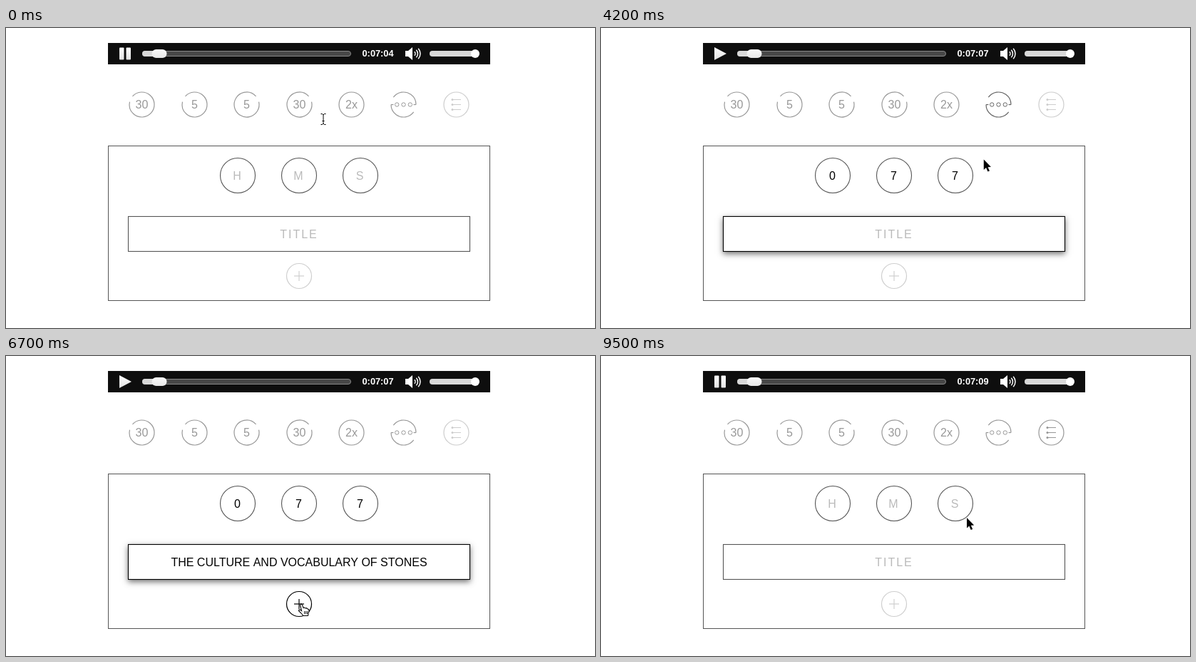
Write an HTML page with a canvas that moves like this. It is 826 px wide and 421 px high and loops after 10000 ms.

```html
<!DOCTYPE html>
<html lang="en">
<head>
<meta charset="utf-8">
<title>Audio player with chapter form</title>
<style>
  html, body { margin: 0; width: 100%; height: 100%; overflow: hidden; background: #fff; }
  canvas { display: block; }
</style>
</head>
<body>
<canvas id="stage" width="826" height="421"></canvas>
<script>
const ctx = document.getElementById('stage').getContext('2d');
const LOOP = 10000, STEP = 100;
const FONT = '"Liberation Sans", Arial, sans-serif';
const TITLE = 'THE CULTURE AND VOCABULARY OF STONES';

// Pointer keys: time, x, y, kind
const POINTER = [
  [0, 445, 128, 'beam'], [100, 445, 128, 'beam'], [200, 430, 140, 'arrow'],
  [400, 370, 156, 'arrow'], [600, 300, 140, 'arrow'], [800, 230, 90, 'arrow'],
  [1000, 180, 48, 'arrow'], [1200, 166, 35, 'arrow'], [1300, 166, 35, 'arrow'],
  [1400, 166, 34, 'arrow'], [1600, 166, 34, 'arrow'], [1700, 167, 32, 'arrow'],
  [1800, 167, 34, 'arrow'], [2900, 167, 34, 'arrow'], [3000, 185, 40, 'arrow'],
  [3300, 576, 131, 'arrow'], [3500, 576, 131, 'arrow'], [3600, 557, 117, 'hand'],
  [4000, 557, 117, 'hand'], [4100, 550, 150, 'arrow'], [4500, 497, 288, 'beam'],
  [4600, 494, 292, 'beam'], [4700, 494, 292, 'beam'], [4800, 489.5, 292, 'beam'],
  [5200, 489.5, 292, 'none'], [6200, 489, 292, 'beam'], [6400, 460, 325, 'arrow'],
  [6600, 416, 347, 'hand'], [6700, 414, 348, 'hand'], [7400, 414, 348, 'hand'],
  [7500, 415.5, 345, 'arrow'], [7900, 415.5, 345, 'arrow'], [8300, 168, 38, 'arrow'],
  [8400, 168, 36, 'arrow'], [8900, 513, 227, 'arrow'], [LOOP, 513, 227, 'arrow']
];
const TICKS = [700, 1700, 2600, 8500, 9500];

const clamp = v => Math.max(0, Math.min(1, v));
const ramp = (t, from, to) => clamp((t - from) / (to - from));
const grey = v => `rgb(${Math.round(v)},${Math.round(v)},${Math.round(v)})`;
const rad = deg => deg * Math.PI / 180;

function line(color, width, ...points) {
  ctx.beginPath();
  points.forEach(([x, y]) => ctx.lineTo(x, y));
  ctx.strokeStyle = color;
  ctx.lineWidth = width;
  ctx.stroke();
}

function polygon(fill, points) {
  ctx.beginPath();
  points.forEach(([x, y]) => ctx.lineTo(x, y));
  ctx.closePath();
  ctx.fillStyle = fill;
  ctx.fill();
}

function arc(x, y, r, color, width = 1.2, from = 0, to = 360) {
  ctx.beginPath();
  ctx.arc(x, y, r, rad(from), rad(to));
  ctx.strokeStyle = color;
  ctx.lineWidth = width;
  ctx.stroke();
}

function disc(x, y, r, color) {
  ctx.beginPath();
  ctx.arc(x, y, r, 0, 7);
  ctx.fillStyle = color;
  ctx.fill();
}

function pill(x, y, w, h, fill, stroke) {
  ctx.beginPath();
  ctx.roundRect(x, y, w, h, h / 2);
  ctx.fillStyle = fill;
  ctx.fill();
  if (stroke) {
    ctx.strokeStyle = stroke;
    ctx.lineWidth = 1;
    ctx.stroke();
  }
}

function text(str, x, y, color, { font = '16px', spacing = 0, align = 'center' } = {}) {
  ctx.font = `${font} ${FONT}`;
  ctx.letterSpacing = `${spacing}px`;
  ctx.textAlign = align;
  ctx.fillStyle = color;
  ctx.fillText(str, x, y);
}

function drawPlayer(t) {
  ctx.fillStyle = '#0e0e0e';
  ctx.fillRect(143, 21, 536, 30);
  const shine = ctx.createLinearGradient(0, 27, 0, 45);
  shine.addColorStop(0, '#fff');
  shine.addColorStop(1, '#e2e2e2');
  if (t < 3000 || t >= 8400) {
    ctx.fillStyle = shine;
    for (const x of [159, 168.5]) {
      ctx.beginPath();
      ctx.roundRect(x, 27.5, 6.5, 17, 1);
      ctx.fill();
    }
  } else {
    polygon(shine, [[159, 27], [176, 36], [159, 45]]);
  }

  pill(191.5, 32.5, 292, 7, '#484848', '#888');
  pill(191, 32, 24, 8, '#d8d8d8');
  pill(204.5, 30, 21, 12, shine);

  const seconds = 4 + TICKS.filter(tick => t >= tick).length;
  text(`0:07:0${seconds}`, 499.5, 40, '#fff', { font: 'bold 12.8px', align: 'left' });

  polygon('#fff', [[560, 32], [564, 32], [570, 27], [570, 45], [564, 40], [560, 40]]);
  arc(570, 36, 4, '#fff', 1.5, -45, 45);
  arc(570, 36, 7.5, '#fff', 1.5, -45, 45);
  arc(570, 36, 11, '#fff', 1.5, -42, 42);
  pill(594, 32, 66, 8, '#d8d8d8');
  disc(658, 36, 6, '#fff');
}

function drawList(t) {
  const x = 631.5, y = 107.5;
  const glow = t < 8000 ? ramp(t, 7200, 7600) : 1 - ramp(t, 7900, 8300);
  const base = 205 - 55 * ramp(t, 7200, 7600);
  ctx.globalAlpha = glow;
  disc(x, y, 18, '#949494');
  ctx.globalAlpha = 1;
  arc(x, y, 17.5, grey(base));
  const ink = grey(base + (255 - base) * glow);
  for (const row of [100.5, 107.5, 114.5]) {
    line(ink, 1, [626, row], [638, row]);
    disc(626, row, 1.5, ink);
  }
}

function drawToolbar(t) {
  const ink = '#989898', y = 107.5;
  const skips = [['30', 190.5, true], ['5', 264.5, true], ['5', 337.5, false], ['30', 411.5, false]];
  for (const [label, x, back] of skips) {
    if (back) arc(x, y, 17.5, ink, 1.2, 222, 553);
    else arc(x, y, 17.5, ink, 1.2, -13, 318);
    text(label, x, 113, ink);
  }
  arc(484.5, y, 17.5, ink);
  text('2x', 484.5, 113, ink);

  const hover = ramp(t, 3600, 3800) * (1 - ramp(t, 4000, 4300));
  const dots = grey(152 * (1 - hover));
  arc(557.5, y, 17.5, dots, 1.2, 216, 360);
  arc(557.5, y, 17.5, dots, 1.2, 36, 180);
  line(dots, 1.2, [540, y], [543.5, y]);
  line(dots, 1.2, [571.5, y], [575, y]);
  for (const x of [548.2, 557.5, 566.8]) arc(x, y, 2.7, dots, 1);
  drawList(t);
}

function drawForm(t) {
  const edge = '#555';
  ctx.strokeStyle = edge;
  ctx.lineWidth = 1;
  ctx.strokeRect(143.5, 165.5, 535, 217);

  const filled = t >= 3900 && t < 7400;
  ['H', 'M', 'S'].forEach((letter, i) => {
    const x = 325 + 86 * i;
    arc(x, 207, 24.5, edge, 1.1);
    if (filled) text('077'[i], x - 0.5, 213, '#000');
    else text(letter, x, 213, '#bababa', { spacing: 2 });
  });

  const focus = ramp(t, 3800, 4200) * (1 - ramp(t, 7200, 7600));
  ctx.save();
  ctx.shadowColor = `rgba(0,0,0,${0.55 * focus})`;
  ctx.shadowBlur = 8;
  ctx.shadowOffsetY = 3;
  ctx.fillStyle = '#fff';
  ctx.fillRect(171, 264, 480, 50);
  ctx.restore();
  ctx.strokeStyle = grey(85 * (1 - focus));
  ctx.strokeRect(171.5, 264.5, 479, 49);

  const count = t < 7400 ? Math.ceil(TITLE.length * ramp(t, 5100, 6100)) : 0;
  const typed = TITLE.slice(0, count);
  if (count) text(typed, 411, 295, '#000');
  else text('TITLE', 411, 295, '#bababa', { spacing: 2 });
  if (t >= 5100 && t < 6400) {
    const caret = 411.5 + (count ? Math.round(ctx.measureText(typed).width / 2) : 0);
    line('#000', 1, [caret, 280], [caret, 298]);
  }

  const active = (0.35 * ramp(t, 5100, 5500) + 0.65 * ramp(t, 6400, 6700)) * (1 - ramp(t, 7200, 7600));
  const ink = grey(207 * (1 - active));
  arc(411, 348, 17.5, ink, 1.2);
  line(ink, 1.2, [404, 348], [418, 348]);
  line(ink, 1.2, [411, 341], [411, 355]);
}

const cursors = {
  none() {},
  beam() {
    for (const s of [-1, 1]) {
      line('#000', 1, [-3.5, 7.5 * s], [-1.5, 7.5 * s], [0, 6 * s], [1.5, 7.5 * s], [3.5, 7.5 * s]);
    }
    line('#000', 1, [0, -6], [0, 6]);
    line('#000', 1, [-1.5, 2.5], [1.5, 2.5]);
  },
  arrow() {
    const shape = [[0, 0], [0, 14.5], [3.3, 11.5], [5.7, 17], [8.2, 16], [5.8, 10.7], [10.2, 10.5]];
    line('#fff', 2, ...shape, shape[0]);
    polygon('#000', shape);
  },
  hand() {
    const shape = [
      [-1.5, 1], [0, 0], [1.5, 1], [3, 5.5], [4.5, 5], [6, 6], [7.5, 5.7], [9, 7], [10.5, 7.5],
      [11, 10], [10, 13], [9.5, 16.5], [3, 16.5], [0, 13], [-3.5, 9.5], [-3, 8], [-1, 8.3], [0.5, 9.5]
    ];
    polygon('#fff', shape);
    line('#000', 1.1, ...shape, shape[0]);
    for (const x of [4.5, 6.5, 8.5]) line('#000', 0.9, [x, 10], [x, 14]);
  }
};

function drawPointer(t) {
  const next = POINTER.findIndex(key => key[0] > t);
  const [t0, x0, y0, kind] = POINTER[next - 1];
  const [t1, x1, y1] = POINTER[next];
  const k = ramp(t, t0, t1);
  ctx.save();
  ctx.translate(x0 + (x1 - x0) * k, y0 + (y1 - y0) * k);
  cursors[kind]();
  ctx.restore();
}

function render(now) {
  const t = Math.floor((now % LOOP) / STEP) * STEP;
  ctx.fillStyle = '#fff';
  ctx.fillRect(0, 0, 826, 421);
  drawPlayer(t);
  drawToolbar(t);
  drawForm(t);
  drawPointer(t);
}

const start = performance.now();
function loop() {
  render(performance.now() - start);
  requestAnimationFrame(loop);
}
loop();
</script>
</body>
</html>
```
